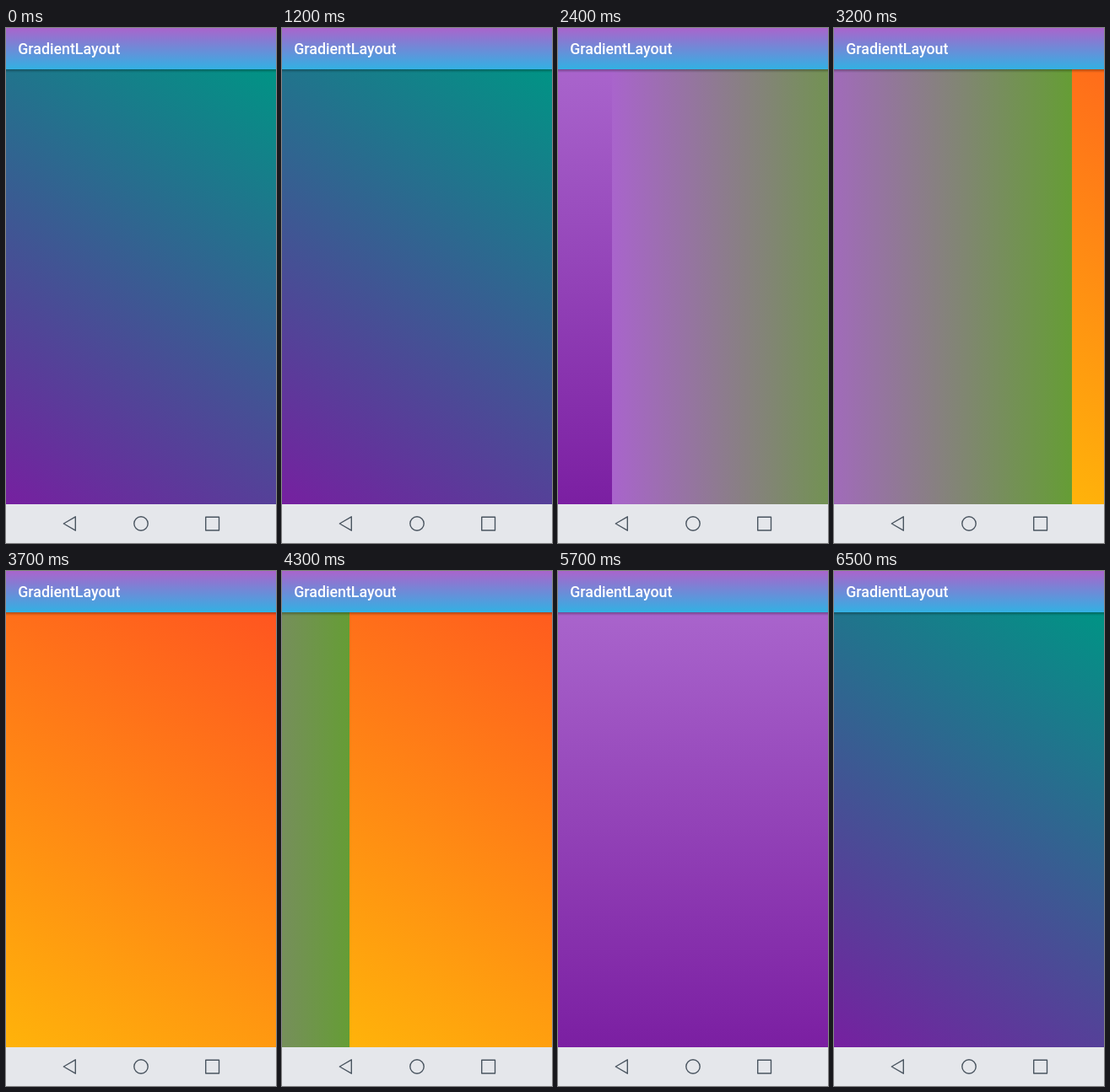
Recreate the animation shown at these times as an HTML page. Size 320x611 px, loop 6700 ms.

```html
<!DOCTYPE html>
<html lang="en">
<head>
<meta charset="utf-8">
<title>GradientLayout</title>
<style>
  html, body { margin: 0; width: 100%; height: 100%; overflow: hidden; }
  #screen { position: relative; width: 320px; height: 611px; overflow: hidden; background: #e5e7eb; }
  #pager { position: absolute; top: 49px; left: 0; width: 320px; height: 516px; overflow: hidden; }
  #track { display: flex; width: 1280px; height: 100%; }
  .page { flex: 0 0 320px; height: 100%; }
  /* 31.8deg runs along the page diagonal */
  .teal { background: linear-gradient(31.8deg, #7620a0, #009485); }
  .violet { background: linear-gradient(#a964cc, #7b1fa2); }
  .green { background: linear-gradient(90deg, #a964cc, #659d35); }
  .orange { background: linear-gradient(31.8deg, #ffb30a, #ff5520); }
  #bar { position: absolute; top: 0; left: 0; width: 320px; height: 49px; background: linear-gradient(#aa64cc, #32b1e3); }
  #shadow { position: absolute; top: 49px; left: 0; width: 320px; height: 4px; background: linear-gradient(rgba(0,0,0,.3), rgba(0,0,0,0)); }
  svg { position: absolute; top: 0; left: 0; }
  text { font: 500 17.78px Roboto, sans-serif; fill: #fff; }
  .nav { fill: none; stroke: #4a5560; stroke-width: 1.4; stroke-linejoin: round; }
</style>
</head>
<body>
<div id="screen">
  <div id="pager">
    <div id="track">
      <div class="page teal"></div>
      <div class="page violet"></div>
      <div class="page green"></div>
      <div class="page orange"></div>
    </div>
  </div>
  <div id="bar"></div>
  <div id="shadow"></div>
  <svg width="320" height="611" viewBox="0 0 320 611">
    <text x="14.2" y="31">GradientLayout</text>
    <g class="nav">
      <path d="M68.3 588 82.3 579.8V596.2Z"/>
      <circle cx="160" cy="588" r="8.2"/>
      <rect x="236.7" y="580.2" width="15.8" height="15.8"/>
    </g>
  </svg>
</div>
<script>
  const LOOP = 6700, STEP = 100, WIDTH = 320;

  // Each swipe: start time, page left, page reached, progress at every step
  const swipes = [
    [1400, 0, 1, [.8, .96, .995, 1]],
    [2400, 1, 2, [.8, .96, .995, 1]],
    [3200, 2, 3, [.12, .5, .85, .96, .995, 1]],
    [4200, 3, 2, [.06, .25, .6, .87, .97, .995, 1]],
    [5300, 2, 1, [.3, .8, .95, .99, 1]],
    [6300, 1, 0, [.8, .98, 1]]
  ];

  const key = (time, page) => ({
    offset: time / LOOP,
    transform: `translateX(${-Math.round(page * WIDTH)}px)`,
    easing: 'step-end'
  });

  const frames = [key(0, 0)];
  for (const [start, from, to, progress] of swipes) {
    progress.forEach((p, i) => frames.push(key(start + i * STEP, from + (to - from) * p)));
  }
  frames.push(key(LOOP, 0));

  document.getElementById('track').animate(frames, { duration: LOOP, iterations: Infinity });
</script>
</body>
</html>
```
